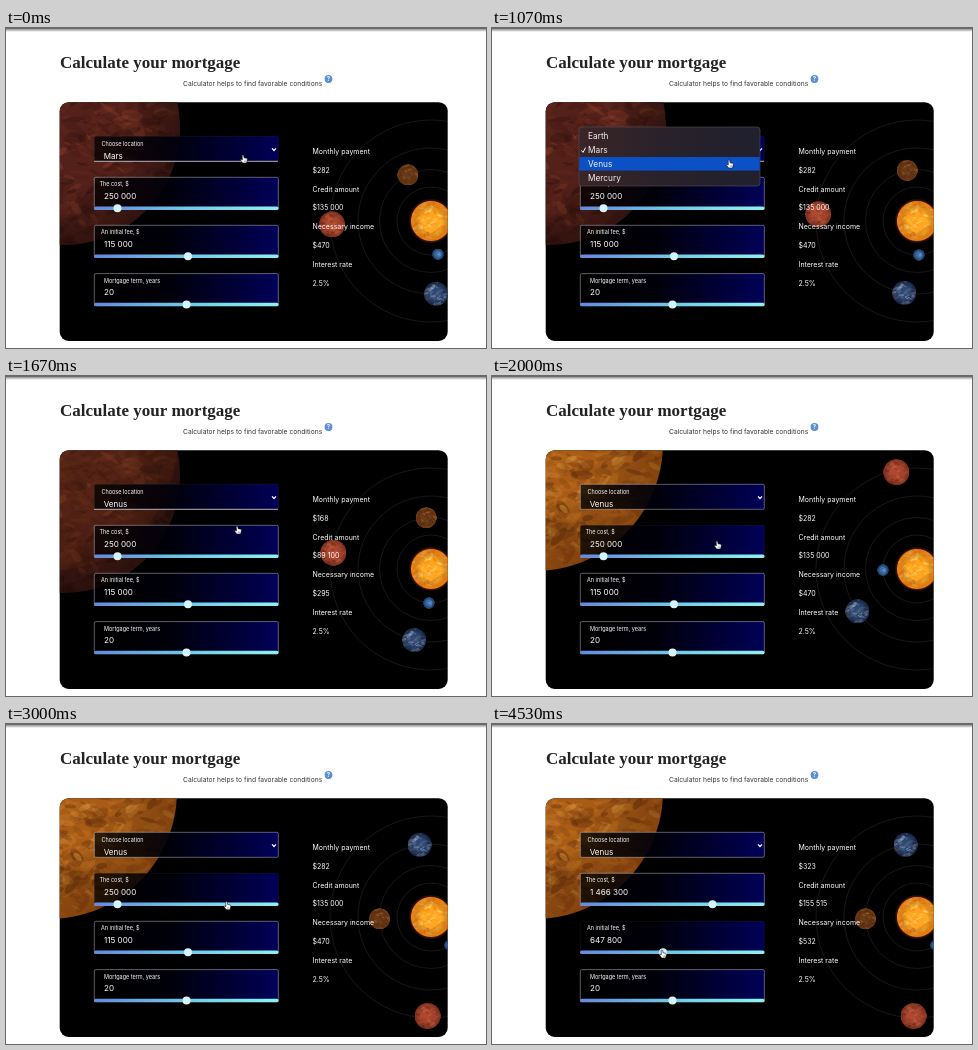
An HTML page with a canvas that plays this animation: 480 by 320 pixels, repeating every 4590 ms.

```html
<!DOCTYPE html>
<html lang="en">
<head>
<meta charset="utf-8">
<title>Mortgage calculator</title>
<style>
  html, body { margin: 0; width: 100%; height: 100%; overflow: hidden; background: #fff; }
  canvas { display: block; width: 480px; height: 320px; }
</style>
</head>
<body>
<canvas id="stage"></canvas>
<script>
const LOOP = 4590, STEP = 200 / 3, TAU = Math.PI * 2;
const SANS = 'Inter, Roboto, sans-serif';
const SERIF = '"Liberation Serif", "Noto Serif", serif';

const canvas = document.getElementById('stage');
const ratio = window.devicePixelRatio || 1;
canvas.width = 480 * ratio;
canvas.height = 320 * ratio;
const ctx = canvas.getContext('2d');

const OPEN = 330, CLOSE = 1250;
const SUN = { x: 425, y: 193 };

// Each change of input restarts the three counters.
const changes = [
  { at: -1000, sum: 135000, skew: [0, 0] },
  { at: 1268, sum: 135000, skew: [-0.064, -0.033] },
  { at: 3095, sum: 1351300, skew: [-0.0041, 0.0011] },
  { at: 4419, sum: 818500, skew: [-0.0007, -0.0029] }
];

const pointer = [
  [0, 238, 131], [330, 238, 131], [600, 238, 136], [1267, 238, 136], [1400, 237, 142],
  [2000, 226, 169], [2533, 224, 175], [3095, 221, 183], [4200, 221, 183], [4330, 171, 230]
];

// Angles in degrees, clockwise from the right.
const orbitTimes = [0, 500, 1640, 2000, 2533, 3000];
const bodies = [
  { orbit: 99, angles: [178, 184, 184, 258, 367, 452] },
  { orbit: 73, angles: [86, 100, 100, 144.6, 210, 261] },
  { orbit: 51.5, angles: [243.4, 259, 259, 335, 447, 538] },
  { orbit: 34, angles: [78, 86.6, 86.6, 178, 314, 416] }
];

const clamp = v => Math.max(0, Math.min(1, v));

function track(t, times, values) {
  let i = 1;
  while (i < times.length - 1 && t > times[i]) i++;
  const k = clamp((t - times[i - 1]) / (times[i] - times[i - 1]));
  return values[i - 1] + (values[i] - values[i - 1]) * k;
}

function random(seed) {
  return () => {
    seed = (seed * 16807) % 2147483647;
    return seed / 2147483647;
  };
}

function disc(g, x, y, r, fill) {
  g.beginPath();
  g.arc(x, y, r, 0, TAU);
  g.fillStyle = fill;
  g.fill();
}

// Paints a mottled ball once, with shading toward the limb.
function makeBall(r, base, tints, count, seed, shade, spot = 0.2) {
  const rnd = random(seed), s = 2 * ratio;
  const c = document.createElement('canvas');
  c.width = c.height = Math.ceil(r * 2 * s);
  const g = c.getContext('2d');
  g.scale(s, s);
  g.translate(r, r);
  disc(g, 0, 0, r, base);
  g.globalCompositeOperation = 'source-atop';
  for (let i = 0; i < count; i++) {
    const a = rnd() * TAU, d = Math.sqrt(rnd()) * r;
    const w = r * spot * (0.3 + rnd()), h = w * (0.15 + rnd() * 0.45);
    g.globalAlpha = 0.15 + rnd() * 0.35;
    g.beginPath();
    g.ellipse(Math.cos(a) * d, Math.sin(a) * d, w, h, -1 + rnd() * 2, 0, TAU);
    g.fillStyle = tints[i % tints.length];
    g.fill();
  }
  g.globalAlpha = 1;
  const limb = g.createRadialGradient(0, 0, r * 0.5, 0, 0, r);
  limb.addColorStop(0, 'rgba(0,0,0,0)');
  limb.addColorStop(1, shade);
  disc(g, 0, 0, r, limb);
  return { r, image: c };
}

const marsTints = ['#8a3c27', '#2c0f0b', '#63271a', '#40150e'];
const venusTints = ['#e29a3a', '#5e2a08', '#c8741c', '#8a4410', '#7a380a'];
const bigMars = makeBall(117, '#54201a', marsTints, 700, 41, 'rgba(0,0,0,.4)', 0.08);
const bigVenus = makeBall(128, '#a85c16', venusTints, 1100, 77, 'rgba(70,22,0,.35)', 0.07);
const sun = makeBall(20, '#ffa41c', ['#ffe98c', '#e86a08', '#ffc83c', '#fff3b4'], 120, 19, 'rgba(235,80,0,.5)', 0.16);
const balls = [
  makeBall(13, '#ae4830', ['#d8704c', '#6a2416', '#983a24'], 60, 5, 'rgba(60,8,0,.4)'),
  makeBall(12, '#2c4878', ['#eef0f2', '#14234a', '#8a7a68', '#1f3866', '#c4ced8'], 60, 29, 'rgba(0,5,25,.5)', 0.28),
  makeBall(10.5, '#6a3a18', ['#d8822e', '#2c160a', '#5c3012'], 55, 13, 'rgba(130,62,10,.55)'),
  makeBall(5.7, '#386ca6', ['#6a9ccc', '#244a80'], 22, 8, 'rgba(0,10,40,.5)', 0.3)
];

function drawBall(ball, x, y) {
  ctx.drawImage(ball.image, x - ball.r, y - ball.r, ball.r * 2, ball.r * 2);
}

function text(str, x, y, size, color = '#fff', family = SANS, weight = '') {
  ctx.font = `${weight} ${size}px ${family}`;
  ctx.fillStyle = color;
  ctx.fillText(str, x, y);
}

function polyline(points, color, width) {
  ctx.beginPath();
  points.forEach(([x, y]) => ctx.lineTo(x, y));
  ctx.strokeStyle = color;
  ctx.lineWidth = width;
  ctx.stroke();
}

const spaced = n => String(Math.round(n)).replace(/\B(?=(\d{3})+$)/g, ' ');

function drawHeader() {
  ctx.fillStyle = '#fff';
  ctx.fillRect(0, 0, 480, 320);
  const shadow = ctx.createLinearGradient(0, 0, 0, 4);
  shadow.addColorStop(0, '#505050');
  shadow.addColorStop(0.4, '#a8a8a8');
  shadow.addColorStop(1, '#fff');
  ctx.fillStyle = shadow;
  ctx.fillRect(0, 0, 480, 4);

  text('Calculate your mortgage', 54, 40, 17, '#222', SERIF, 'bold');
  text('Calculator helps to find favorable conditions', 177, 58.4, 6.7, '#333');
  disc(ctx, 322.5, 51, 3.9, '#5b8fd2');
  ctx.textAlign = 'center';
  text('?', 322.5, 53.2, 6, '#fff', SANS, 'bold');
  ctx.textAlign = 'left';
}

function drawSpace(t) {
  ctx.fillStyle = '#000';
  ctx.fillRect(53, 73, 390, 241);
  const fade = clamp((t - 1640) / 200);
  ctx.globalAlpha = 1 - fade;
  if (fade < 1) drawBall(bigMars, 57, 100);
  ctx.globalAlpha = fade;
  if (fade > 0) drawBall(bigVenus, 43, 67);
  ctx.globalAlpha = 1;

  ctx.strokeStyle = 'rgba(255,255,255,.13)';
  ctx.lineWidth = 0.7;
  for (const b of bodies) {
    ctx.beginPath();
    ctx.arc(SUN.x, SUN.y, b.orbit + (b.orbit > 90 ? 2 : 0), 0, TAU);
    ctx.stroke();
  }
  const glow = ctx.createRadialGradient(SUN.x, SUN.y, 19, SUN.x, SUN.y, 22.5);
  glow.addColorStop(0, 'rgba(255,110,10,.4)');
  glow.addColorStop(1, 'rgba(255,90,0,0)');
  disc(ctx, SUN.x, SUN.y, 22.5, glow);
  drawBall(sun, SUN.x, SUN.y);

  bodies.forEach((b, i) => {
    const a = track(t, orbitTimes, b.angles) * Math.PI / 180;
    drawBall(balls[i], SUN.x + Math.cos(a) * b.orbit, SUN.y + Math.sin(a) * b.orbit);
  });
}

function drawBox(y, h, hover) {
  const fill = ctx.createLinearGradient(88, 0, 272, 0);
  fill.addColorStop(0, 'rgba(0,0,0,.75)');
  fill.addColorStop(0.4, 'rgba(0,0,10,.92)');
  fill.addColorStop(1, '#000058');
  ctx.beginPath();
  ctx.roundRect(88.3, y + 0.3, 184, h, 1.5);
  ctx.fillStyle = fill;
  ctx.fill();
  ctx.strokeStyle = hover ? 'rgba(90,90,100,.2)' : 'rgba(205,205,215,.65)';
  ctx.lineWidth = 0.7;
  ctx.stroke();
}

function drawSlider(y, hover, label, labelX, value, thumb) {
  drawBox(y, 32, hover);
  text(label, labelX, y + 9.2, 5.5);
  text(value, 98, y + 22.1, 8.05);
  const bar = ctx.createLinearGradient(88, 0, 272, 0);
  bar.addColorStop(0, '#6689dc');
  bar.addColorStop(0.55, '#72cfe8');
  bar.addColorStop(1, '#90f0ee');
  ctx.beginPath();
  ctx.roundRect(88, y + 29.4, 184.5, 3.6, 1.6);
  ctx.fillStyle = bar;
  ctx.fill();
  disc(ctx, thumb, y + 31.2, 4, '#d4f3fa');
}

function drawForm(t) {
  const raised = t >= 3095, paid = t >= 4419;
  const hover = t < 1700 ? 0 : t < 4320 ? 1 : 2;

  drawBox(108, 25, hover === 0);
  if (hover === 0) polyline([[88, 133.3], [272, 133.3]], '#c4c4c8', 0.9);
  text('Choose location', 95.4, 118.2, 5.5);
  text(t < CLOSE ? 'Mars' : 'Venus', 97.7, 131, 8.05);
  polyline([[266, 120.3], [268, 122.5], [270, 120.3]], '#fff', 1.2);

  drawSlider(149, hover === 1, 'The cost, $', 93.4, raised ? '1 466 300' : '250 000', raised ? 220.5 : 111.5);
  drawSlider(197, hover === 2, 'An initial fee, $', 95, paid ? '647 800' : '115 000', paid ? 171 : raised ? 107 : 182);
  drawSlider(245.3, false, 'Mortgage term, years', 98, '20', 180.5);
}

function drawResults(t) {
  const now = changes.filter(c => t >= c.at).pop();
  const p = clamp(Math.round((t - now.at) / 6) / 100);
  const part = skew => p < 1 ? clamp(p + skew) : 1;
  const pay = Math.ceil(now.sum / 480);
  const rows = [
    'Monthly payment', '$' + spaced(pay * part(now.skew[0])),
    'Credit amount', '$' + spaced(now.sum * p),
    'Necessary income', '$' + spaced(pay / 0.6 * part(now.skew[1])),
    'Interest rate', '2.5%'
  ];
  rows.forEach((row, i) => text(row, 306.5, 125.6 + i * 18.95, 7));
}

function drawMenu() {
  const back = ctx.createLinearGradient(87, 0, 268, 0);
  back.addColorStop(0, '#3a2526');
  back.addColorStop(0.45, '#29222a');
  back.addColorStop(1, '#20202f');
  ctx.beginPath();
  ctx.roundRect(87, 99, 181, 59, 3);
  ctx.fillStyle = back;
  ctx.fill();
  ctx.strokeStyle = '#55505a';
  ctx.lineWidth = 0.6;
  ctx.stroke();
  ctx.fillStyle = '#0b50c4';
  ctx.fillRect(87.3, 129, 180.4, 13.6);
  ['Earth', 'Mars', 'Venus', 'Mercury'].forEach((name, i) =>
    text(name, 96, 111.4 + i * 13.7, 8.3, '#f2f2f4'));
  polyline([[89.4, 122.4], [91, 124.4], [93.6, 119.6]], '#fff', 1);
}

function drawPointer(t) {
  const times = pointer.map(p => p[0]);
  const x = track(t, times, pointer.map(p => p[1]));
  const y = track(t, times, pointer.map(p => p[2]));
  ctx.save();
  ctx.translate(x, y);
  ctx.beginPath();
  ctx.moveTo(-1.9, -3.6);
  ctx.quadraticCurveTo(-1, -4.6, -0.3, -3.5);
  ctx.lineTo(0, -1.3);
  ctx.lineTo(2.6, -0.7);
  ctx.quadraticCurveTo(3.5, -0.4, 3.3, 0.8);
  ctx.lineTo(2.5, 4);
  ctx.lineTo(-1.3, 4);
  ctx.lineTo(-3.5, 1);
  ctx.quadraticCurveTo(-3.4, -0.3, -1.6, 0.8);
  ctx.closePath();
  ctx.fillStyle = '#fff';
  ctx.fill();
  ctx.strokeStyle = '#111';
  ctx.lineWidth = 0.6;
  ctx.stroke();
  polyline([[0.2, 1.4], [0.3, 3]], '#444', 0.4);
  polyline([[1.5, 1.4], [1.5, 3]], '#444', 0.4);
  ctx.restore();
}

function draw(t) {
  ctx.setTransform(ratio, 0, 0, ratio, 0, 0);
  drawHeader();
  ctx.save();
  ctx.beginPath();
  ctx.roundRect(53.7, 74.2, 388, 238.8, 9);
  ctx.clip();
  drawSpace(t);
  drawForm(t);
  drawResults(t);
  if (t >= OPEN && t < CLOSE) drawMenu();
  drawPointer(t);
  ctx.restore();
}

const start = performance.now();
function tick() {
  const t = (performance.now() - start) % LOOP;
  // The picture advances fifteen times a second.
  draw(Math.min(68, Math.floor((t + 5) / STEP)) * STEP);
  requestAnimationFrame(tick);
}
tick();
</script>
</body>
</html>
```
